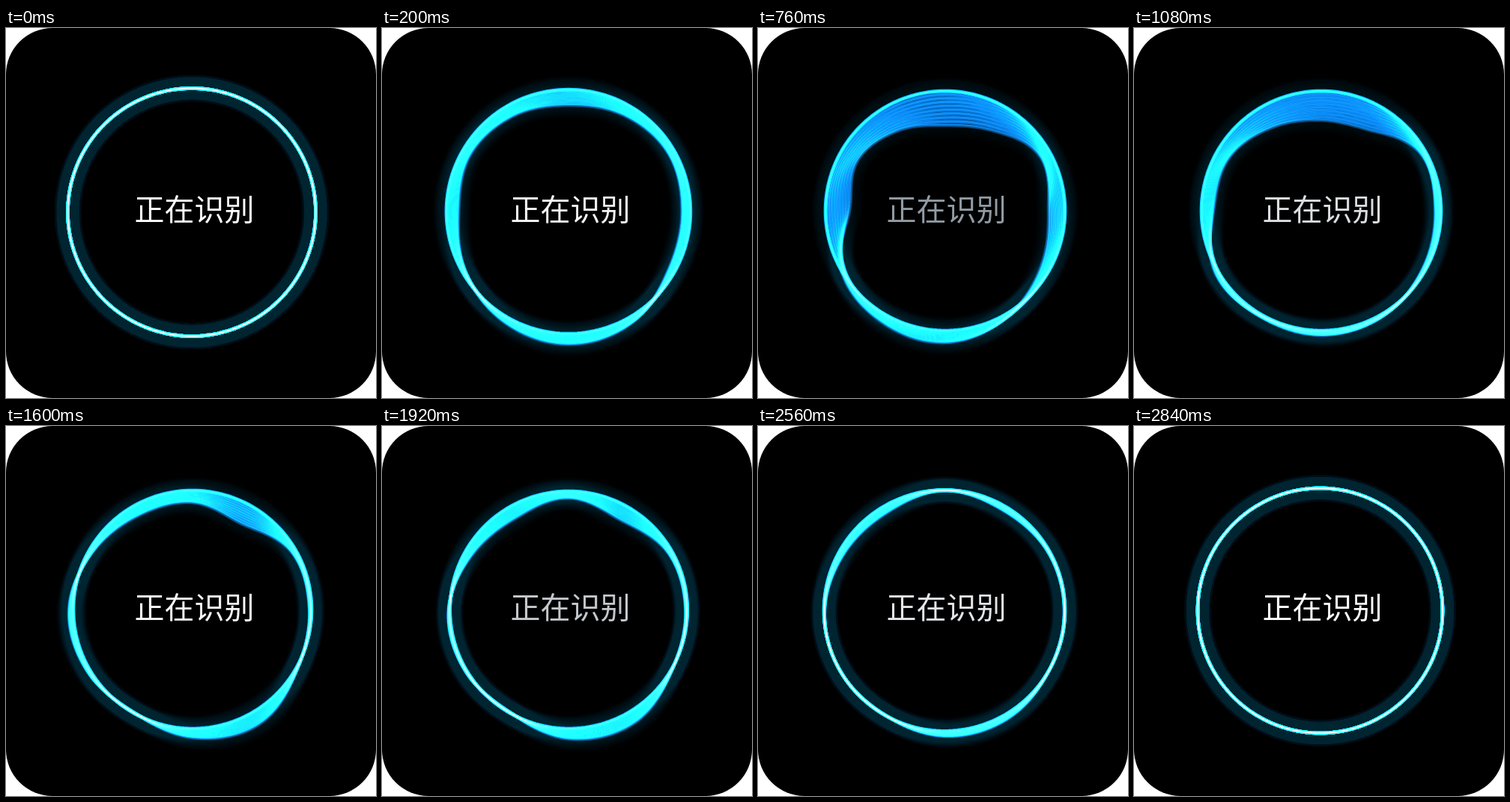
These frames come from a looping animation (494 px wide and 494 px high, 2.88 s). An HTML page with a canvas:

```html
<!DOCTYPE html>
<html lang="zh">
<head>
<meta charset="utf-8">
<style>
  html, body { margin: 0; width: 100%; height: 100%; overflow: hidden; background: #fff; }
  canvas { display: block; }
</style>
</head>
<body>
<canvas id="stage" width="494" height="494"></canvas>
<script>
const ctx = document.getElementById('stage').getContext('2d');
const LOOP = 2880, STEP = 40, FAN = 9, TAU = Math.PI * 2;

// Radial offsets are given every 30 degrees, clockwise from the right.
const flat = Array(12).fill(0);
const poses = [
  { t: 0, r: 165.5, x: 248, y: 246, twist: 0, wave: flat },
  { t: 440, r: 160, x: 250, y: 244, twist: .32, wave: [-25, -19, 17, 31, 17, -9, -36, -25, -34, -46, -32, -19] },
  { t: 760, r: 160, x: 250, y: 244, twist: .3, wave: [-22, -12, 4, 16, 11, 0, -32, -25, -36, -46, -36, -14] },
  { t: 1080, r: 160, x: 250, y: 244, twist: .25, wave: [-8, -4, 3, 6, 3, 4, -16, -18, -31, -39, -35, -7] },
  { t: 1600, r: 159, x: 249, y: 245, twist: .08, wave: [-3, 2, 18, 12, -1, 4, 6, -5, -14, -16, -27, -6] },
  { t: 2240, r: 158, x: 249.5, y: 246, twist: .04, wave: [-2, 0, 14, 15, -1, 0, -2, -15, -20, -2, -13, -5] },
  { t: 2840, r: 163.5, x: 248.5, y: 246.5, twist: 0, wave: flat },
  { t: 2880, r: 165.5, x: 248, y: 246, twist: 0, wave: flat }
];

const mix = (a, b, k) => a + (b - a) * k;

function poseAt(t) {
  const i = poses.findIndex(p => p.t > t);
  const a = poses[i - 1], b = poses[i], k = (t - a.t) / (b.t - a.t);
  const pose = { wave: a.wave.map((v, n) => mix(v, b.wave[n], k)) };
  for (const key of ['r', 'x', 'y', 'twist']) pose[key] = mix(a[key], b[key], k);
  return pose;
}

// Cyclic Catmull-Rom interpolation of the offsets.
function offsetAt(wave, angle) {
  const s = ((angle / TAU * 12) % 12 + 12) % 12, i = Math.floor(s), f = s - i;
  const [a, b, c, d] = [11, 0, 1, 2].map(n => wave[(i + n) % 12]);
  return b + f / 2 * (c - a + f * (2 * a - 5 * b + 4 * c - d + f * (3 * (b - c) + d - a)));
}

function ring(pose, u) {
  const path = new Path2D();
  for (let n = 0; n < 180; n++) {
    const angle = n / 180 * TAU;
    const r = pose.r + u * offsetAt(pose.wave, angle + (1 - u) * pose.twist);
    path.lineTo(pose.x + r * Math.cos(angle), pose.y + r * Math.sin(angle));
  }
  path.closePath();
  return path;
}

function strokeAll(paths, width, color) {
  ctx.lineWidth = width;
  ctx.strokeStyle = color;
  paths.forEach(p => ctx.stroke(p));
}

function draw(t) {
  ctx.globalCompositeOperation = 'source-over';
  ctx.clearRect(0, 0, 494, 494);
  ctx.fillStyle = '#000';
  ctx.beginPath();
  ctx.roundRect(0, 0, 494, 494, 62);
  ctx.fill();

  const pose = poseAt(t);
  const base = ring(pose, 0);
  const lines = [base, base, base];
  for (let k = 1; k <= FAN; k++) lines.push(ring(pose, k / FAN));

  ctx.globalCompositeOperation = 'lighter';
  ctx.lineJoin = 'round';
  strokeAll(lines, 35, 'rgb(0,1,2)');
  strokeAll(lines, 30, 'rgb(0,2,2)');
  const band = new Path2D(base);
  band.addPath(lines[lines.length - 1]);
  ctx.fillStyle = 'rgb(0,45,90)';
  ctx.fill(band, 'evenodd');
  strokeAll(lines, 4.6, 'rgb(4,62,112)');
  strokeAll(lines, 2, 'rgb(16,18,20)');

  ctx.globalCompositeOperation = 'source-over';
  const glow = .5 + .5 * Math.cos(t / 1440 * TAU);
  const [r, g, b] = [135, 145, 155].map(v => mix(v, 255, Math.sqrt(glow)));
  ctx.fillStyle = `rgb(${r},${g},${b})`;
  ctx.font = '40px "Noto Sans CJK SC", "Noto Sans CJK", sans-serif';
  ctx.textAlign = 'center';
  ctx.fillText('正在识别', 251.5, 257);
}

function frame() {
  draw(Math.floor(performance.now() % LOOP / STEP) * STEP);
  requestAnimationFrame(frame);
}
frame();
</script>
</body>
</html>
```
